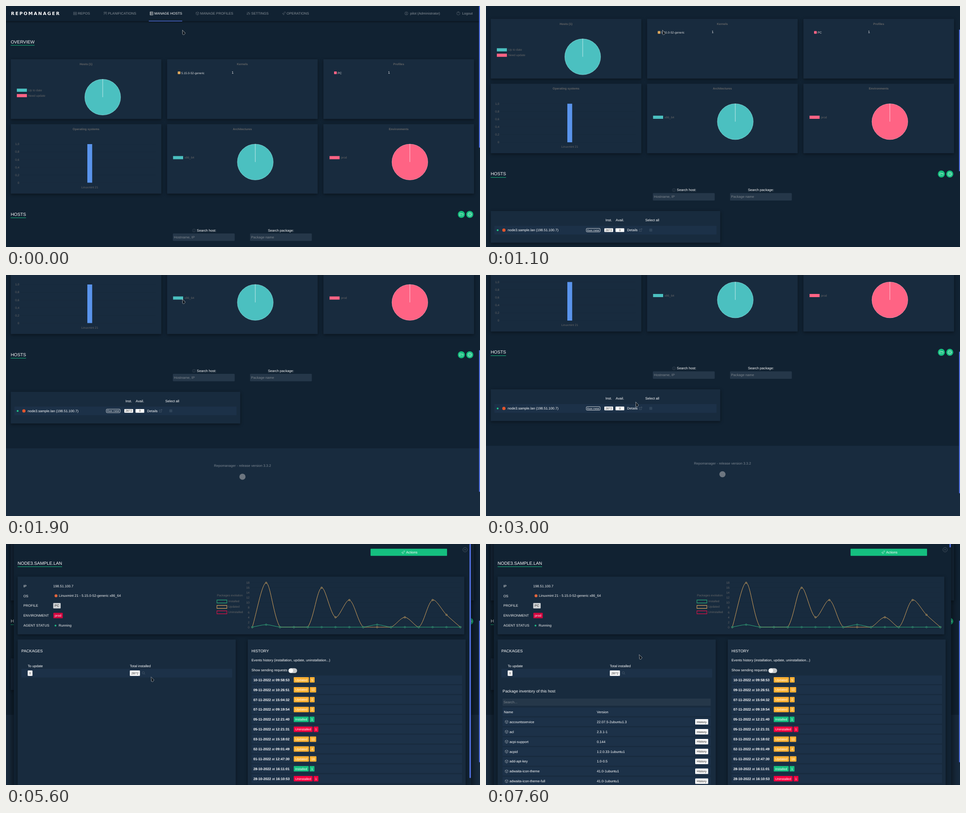
These frames come from a looping animation (1049 px wide and 534 px high, 9500 ms). An HTML page with a canvas:

```html
<!DOCTYPE html>
<html lang="en">
<head>
<meta charset="utf-8">
<title>Manage hosts</title>
<style>
html, body { margin: 0; width: 100%; height: 100%; overflow: hidden; background: #112232; }
canvas { display: block; }
</style>
</head>
<body>
<canvas id="stage" width="1049" height="534"></canvas>
<script>
const W = 1049, H = 534, LOOP = 9500, STEP = 100;
const K = W / 1920; // the interface is laid out for a 1920 px wide window
const BG = '#112232', CARD = '#182b3e', ROW = '#1c3148', INPUT = '#253749';
const GREEN = '#15bf7f', RED = '#f5003f', AMBER = '#ffb032', BLUE = '#5473e8';
const TEAL = '#4bc0c0', PINK = '#ff6384', ORANGE = '#d9a55c', MINT = '#2cae7d';
const GREY = '#666', DIM = 'rgba(255,255,255,.5)', FAINT = 'rgba(255,255,255,.22)';
const HOST = 'node3.sample.lan', IP = '198.51.100.7';

const stage = document.getElementById('stage').getContext('2d');
const layer = document.createElement('canvas');
layer.width = W;
layer.height = H;
const panel = layer.getContext('2d');
let c = stage;

// [time, value...] keys
const SCROLL = [[800, 0], [900, 20], [1000, 62], [1100, 89.5], [1200, 110], [1300, 119],
  [1400, 119], [1500, 147], [1600, 190], [1700, 230], [1800, 264], [1900, 285], [2000, 290.5]];
const POINTER = [[2000, 390.5, 53.5], [2100, 389, 62], [2400, 371, 146], [2500, 371, 146],
  [2800, 340, 245], [3100, 327, 300], [3200, 327, 300], [3500, 340, 299], [3800, 331.5, 295.5],
  [5400, 331.5, 295.5], [5600, 321.2, 294.8], [5900, 321.2, 294.8], [6400, 302, 282.5],
  [6600, 302, 282.5], [6800, 248, 297], [7000, 303, 283], [7100, 303, 283], [7300, 339.2, 245.3]];

function sample(keys, t) {
  let i = 0;
  while (i < keys.length - 1 && keys[i + 1][0] <= t) i++;
  const a = keys[i], b = keys[i + 1] || a;
  const u = b === a ? 0 : Math.max(0, (t - a[0]) / (b[0] - a[0]));
  return a.slice(1).map((v, n) => v + (b[n + 1] - v) * u);
}

const clamp = (v, lo, hi) => Math.min(hi, Math.max(lo, v));

// --- drawing helpers; text y is the middle of the capitals ---
function text(s, x, y, { size = 14, color = '#fff', bold = false, align = 'left',
  family = '"Liberation Sans", Arial, sans-serif', gap = 0 } = {}) {
  c.save();
  c.translate(x, y + size * K * 0.36);
  c.scale(K, K);
  c.font = `${bold ? 'bold ' : ''}${size}px ${family}`;
  c.textRendering = 'geometricPrecision';
  c.letterSpacing = gap + 'px';
  c.textAlign = align;
  c.fillStyle = color;
  c.fillText(s, 0, 0);
  const w = c.measureText(s).width * K;
  c.restore();
  return w;
}

function box(x, y, w, h, color, r = 0) {
  c.fillStyle = color;
  c.beginPath();
  c.roundRect(x, y, w, h, r);
  c.fill();
}

function frame(x, y, w, h, color, r = 0, lw = 0.8) {
  c.strokeStyle = color;
  c.lineWidth = lw;
  c.beginPath();
  c.roundRect(x, y, w, h, r);
  c.stroke();
}

function disc(x, y, r, color) {
  c.fillStyle = color;
  c.beginPath();
  c.arc(x, y, r, 0, 7);
  c.fill();
}

function ring(x, y, r, color, lw = 0.7) {
  c.strokeStyle = color;
  c.lineWidth = lw;
  c.beginPath();
  c.arc(x, y, r, 0, 7);
  c.stroke();
}

function path(points, color, lw = 0.7, close = false) {
  c.strokeStyle = color;
  c.lineWidth = lw;
  c.beginPath();
  points.forEach(([x, y]) => c.lineTo(x, y));
  if (close) c.closePath();
  c.stroke();
}

function card(x, y, w, h) {
  c.save();
  c.shadowColor = 'rgba(0,0,0,.45)';
  c.shadowBlur = 7;
  c.shadowOffsetY = 2;
  box(x, y, w, h, CARD, 1);
  c.restore();
}

function heading(s, x, y) {
  const w = text(s, x, y, { size: 18 });
  box(x, y + 7.6, w, 0.9, GREEN);
}

// a filled label; returns its right edge
function badge(s, x, y, bg, color = '#fff') {
  const w = text(s, x, -99, { size: 13 }) + 6.6;
  box(x, y - 6, w, 12, bg, 1.2);
  text(s, x + 3.3, y, { size: 13, color });
  return x + w;
}

const icons = {
  stack(x, y, col) {
    for (const d of [-2, 0.3, 2.6]) frame(x - 3.5, y + d - 1, 7, 1.8, col, 0, 0.6);
  },
  plan(x, y, col) {
    frame(x - 3, y - 3, 2.4, 2.4, col);
    frame(x + 0.6, y - 3, 2.4, 2.4, col);
    path([[x - 3, y + 1], [x + 3, y + 1], [x + 3, y + 3.4]], col);
    path([[x - 3, y + 3.3], [x - 3, y + 1]], col);
  },
  list(x, y, col) {
    frame(x - 3.2, y - 3.4, 6.4, 7, col);
    for (const d of [-1.2, 1.2]) path([[x - 3, y + d], [x + 3, y + d]], col);
    path([[x - 1.2, y - 3.3], [x - 1.2, y + 3.5]], col);
  },
  cube(x, y, col) {
    path([[x, y - 3.6], [x + 3.2, y - 1.9], [x + 3.2, y + 1.9], [x, y + 3.6],
      [x - 3.2, y + 1.9], [x - 3.2, y - 1.9]], col, 0.7, true);
    path([[x - 3.2, y - 1.9], [x, y - 0.2], [x + 3.2, y - 1.9]], col);
    path([[x, y - 0.2], [x, y + 3.6]], col);
  },
  sliders(x, y, col) {
    [-2.6, 0, 2.6].forEach((d, i) => {
      path([[x + d, y - 3.5], [x + d, y + 3.5]], col, 0.6);
      disc(x + d, y + [1.5, -1.5, 0.8][i], 0.9, col);
    });
  },
  rocket(x, y, col) {
    path([[x - 1.6, y - 0.2], [x + 1, y - 2.8], [x + 3.3, y - 3.3], [x + 2.8, y - 1],
      [x + 0.2, y + 1.6]], col, 0.7, true);
    path([[x - 1.6, y - 0.2], [x - 3.3, y + 0.2], [x - 2, y + 2], [x - 0.2, y + 3.3], [x + 0.2, y + 1.6]], col);
  },
  user(x, y, col) {
    ring(x, y, 3.6, col);
    ring(x, y - 0.8, 1.2, col, 0.6);
    path([[x - 2, y + 2.4], [x, y + 1.2], [x + 2, y + 2.4]], col, 0.6);
  },
  power(x, y, col) {
    ring(x, y, 3.5, col);
    path([[x, y - 4], [x, y]], col);
  },
  info(x, y, col) {
    ring(x, y, 3.4, col, 0.6);
    path([[x, y - 0.6], [x, y + 1.9]], col);
    disc(x, y - 1.7, 0.4, col);
  },
  link(x, y, col) {
    path([[x + 0.3, y - 2], [x - 2.8, y - 2], [x - 2.8, y + 2.8], [x + 2, y + 2.8], [x + 2, y]], col);
    path([[x - 0.5, y + 0.5], [x + 3, y - 3], [x + 0.8, y - 3]], col);
    path([[x + 3, y - 3], [x + 3, y - 0.8]], col);
  },
  lens(x, y, col) {
    ring(x - 0.6, y - 0.6, 2.5, col);
    path([[x + 1.2, y + 1.2], [x + 3.4, y + 3.4]], col);
  },
  folder(x, y, col) {
    path([[x - 3.8, y + 2.8], [x - 3.8, y - 2.8], [x - 1.2, y - 2.8], [x - 0.4, y - 1.8],
      [x + 3.2, y - 1.8], [x + 3.2, y - 0.8]], col);
    path([[x - 3.8, y + 2.8], [x - 2.4, y - 0.8], [x + 4.4, y - 0.8], [x + 3.2, y + 2.8]], col, 0.7, true);
  },
  gear(x, y, col) {
    ring(x, y, 1.7, col);
    c.setLineDash([1.7, 1.2]);
    ring(x, y, 4, col, 1.2);
    c.setLineDash([]);
    ring(x, y, 3.5, col, 0.5);
  },
};

// --- the page ---
const NAV = [['stack', 152.8, 'REPOS', 159], ['plan', 219.8, 'PLANIFICATIONS', 225.7],
  ['list', 322, 'MANAGE HOSTS', 328.2], ['cube', 423.7, 'MANAGE PROFILES', 429.8],
  ['sliders', 536.5, 'SETTINGS', 542.8], ['rocket', 615, 'OPERATIONS', 621],
  ['user', 886, 'pilot (Administrator)', 894.3], ['power', 1001, 'Logout', 1009.5]];

function nav() {
  c.save();
  c.shadowColor = 'rgba(0,0,0,.5)';
  c.shadowBlur = 4;
  c.shadowOffsetY = 1;
  box(-5, -5, W + 10, 38.5, BG);
  c.restore();
  text('REPOMANAGER', 11, 16.3, { size: 18, bold: true, gap: 4, family: '"DejaVu Sans", sans-serif' });
  NAV.forEach(([icon, ix, label, x], i) => {
    const on = i === 2;
    icons[icon](ix, 16.4, on ? '#ddd' : 'rgba(255,255,255,.3)');
    text(label, x, on ? 16 : 16.5, { color: on ? '#fff' : DIM });
  });
  box(316, 32.7, 74, 1.3, BLUE);
}

function pie(x, y, color) {
  disc(x, y, 40, color);
  ring(x, y, 39.7, 'rgba(255,255,255,.4)', 0.6);
  path([[x, y], [x, y - 40]], 'rgba(255,255,255,.75)', 0.9);
}

function key(x, y, color, label) {
  box(x, y - 3.5, 22.3, 7, color);
  text(label, x + 25.3, y - 0.2, { size: 12, color: GREY });
}

function item(x, color, label) {
  box(x, 145, 6, 6, color, 1);
  text(label, x + 8, 148.5, { size: 12, color: '#ddd' });
  text('1', x + 119.5, 146.8, { color: '#eee' });
}

function overview() {
  heading('OVERVIEW', 10.4, 79);
  ['Hosts (1)', 'Kernels', 'Profiles', 'Operating systems', 'Architectures', 'Environments'].forEach((s, i) => {
    const x = 10.4 + (i % 3) * 346, low = i > 2;
    card(x, low ? 261.7 : 118, 333.4, low ? 154 : 132.3);
    text(s, x + 166.7, low ? 272.6 : 129, { size: 12, bold: true, color: GREY, align: 'center' });
  });
  key(24, 186.6, TEAL, 'Up to date');
  key(24, 198.6, PINK, 'Need update');
  pie(214, 202, TEAL);
  item(380, ORANGE, '5.15.0-52-generic');
  item(726, PINK, 'PC');

  for (let i = 0; i <= 5; i++) {
    const y = 391.5 - i * 17.1;
    box(32, y - 0.3, 299, 0.6, 'rgba(0,0,0,.1)');
    text(i === 0 ? '0' : i === 5 ? '1,0' : '0,' + i * 2, 29.4, y, { size: 12, color: GREY, align: 'right' });
  }
  box(180, 306, 10.7, 85.5, '#5a94ec');
  text('Linuxmint 21', 185.3, 401.6, { size: 12, color: GREY, align: 'center' });
  key(369.7, 336, TEAL, 'x86_64');
  pie(551.7, 345.7, TEAL);
  key(716, 336, PINK, 'prod');
  pie(893.8, 345.7, PINK);
}

function hosts() {
  heading('HOSTS', 10.4, 461.2);
  disc(1007.7, 461.8, 7.7, GREEN);
  disc(1026.4, 461.8, 7.7, GREEN);
  icons.folder(1007.7, 461.8, 'rgba(255,255,255,.65)');
  icons.gear(1026.4, 461.8, 'rgba(255,255,255,.65)');

  icons.info(416, 497.4, FAINT);
  text('Search host:', 422.3, 497);
  text('Search package:', 608.4, 497, { align: 'center' });
  [[369.3, 'Hostname, IP'], [540, 'Package name']].forEach(([x, s]) => {
    box(x, 504, 136.8, 16.4, INPUT, 1.5);
    text(s, x + 2.2, 512.2, { color: '#7d858d' });
  });

  card(10.4, 543.8, 508, 70.3);
  text('Inst.', 264.3, 564);
  text('Avail.', 287, 564);
  text('Select all', 352.4, 564);
  box(18.5, 576.5, 491.8, 19.2, ROW, 1);
  const y = 586;
  disc(25.8, y + 0.3, 2, '#1fc98a');
  disc(39.6, y + 0.2, 3.6, '#e2552c');
  text(`${HOST} (${IP})`, 48, y);
  frame(222, y - 3.7, 30.6, 7.7, '#fff', 1.5);
  text('Bare metal', 237.3, y + 0.3, { size: 10, align: 'center' });
  [[271.6, '2872'], [296.3, '0']].forEach(([x, s]) => {
    box(x - 9.7, y - 4, 19.4, 8.2, '#fff', 1);
    text(s, x, y + 0.1, { size: 12, color: '#222', align: 'center' });
  });
  text('Details', 312.3, y);
  icons.link(342, y, FAINT);
  box(361.5, y - 3.2, 6.5, 6.5, '#2f4459', 1);
}

function page(scroll) {
  box(0, 0, W, H, BG);
  c.save();
  c.translate(0, -scroll);
  nav();
  overview();
  hosts();
  box(0, 669, W, 300, CARD);
  text('Repomanager - release version 3.3.2', 523.3, 707.4, { color: '#7b858f', align: 'center' });
  disc(523.3, 732, 6.8, '#6d7680');
  c.restore();
  box(1046.9, scroll * 0.584, 2.1, 314, BLUE, 1);
}

// --- the host panel ---
const UPDATED = [0, 18, 0, 0, 0, 16, 4, 11, 0, 0, 0, 4, 0, 11, 5, 0];
const INSTALLED = UPDATED.map((v, i) => i === 1 || i === 9 ? 1 : 0);
const TOP = 86, BASE = 184.2;

function curve(values, grow, color) {
  const p = values.map((v, i) => [545 + i * 30.7, BASE - v * grow * (BASE - TOP) / 18]);
  const dist = (a, b) => Math.hypot(b[0] - a[0], b[1] - a[1]);
  const ctl = p.map((q, i) => {
    const a = p[i - 1] || q, b = p[i + 1] || q, d = dist(a, q), e = dist(q, b);
    const at = f => [q[0] + f * (b[0] - a[0]), clamp(q[1] + f * (b[1] - a[1]), TOP, BASE)];
    return [at(-0.3 * d / (d + e)), at(0.3 * e / (d + e))];
  });
  c.strokeStyle = color;
  c.lineWidth = 1;
  c.beginPath();
  c.moveTo(...p[0]);
  for (let i = 1; i < p.length; i++) c.bezierCurveTo(...ctl[i - 1][1], ...ctl[i][0], ...p[i]);
  c.stroke();
  for (const [x, y] of p) {
    disc(x, y, 1.7, '#30424d');
    ring(x, y, 1.7, color, 0.9);
  }
}

function chart(grow) {
  text('Packages evolution', 467, 113.3, { size: 12, color: GREY });
  [['Installed', MINT], ['Updated', ORANGE], ['Uninstalled', '#e0104a']].forEach(([s, col], i) => {
    const y = 127.3 + i * 12;
    frame(466.8, y - 3.2, 22, 6.5, col, 0, 1.1);
    text(s, 492, y - 0.2, { size: 12, color: GREY });
  });
  for (let v = 0; v <= 18; v += 2) {
    const y = BASE - v * (BASE - TOP) / 18;
    box(541, y - 0.3, 465, 0.6, 'rgba(0,0,0,.1)');
    text(String(v), 539, y, { size: 12, color: GREY, align: 'right' });
  }
  curve(UPDATED, grow, ORANGE);
  curve(INSTALLED, grow, MINT);
}

function details(grow) {
  box(806.8, 10.5, 169.3, 15.7, GREEN, 1);
  icons.rocket(879, 18.5, 'rgba(255,255,255,.7)');
  text('Actions', 885.5, 18.4);
  ring(1016, 12.7, 4.9, 'rgba(255,255,255,.3)');
  path([[1014.3, 11], [1017.7, 14.4]], 'rgba(255,255,255,.3)');
  path([[1017.7, 11], [1014.3, 14.4]], 'rgba(255,255,255,.3)');
  heading(HOST.toUpperCase(), 25.7, 42.2);

  card(25.7, 72.3, 988.6, 128);
  ['IP', 'OS', 'PROFILE', 'ENVIRONMENT', 'AGENT STATUS'].forEach((s, i) =>
    text(s, 38.4, 92.8 + i * 21.95, { color: '#eee' }));
  text(IP, 104.5, 92.8, { color: '#eee' });
  disc(110.7, 114.8, 3.2, '#e2653c');
  text('Linuxmint 21 - 5.15.0-52-generic x86_64', 117, 114.7, { color: '#eee' });
  badge('PC', 104.5, 136.7, '#d0d3d6', '#222');
  badge('prod', 104.8, 158.6, '#d4063f');
  disc(109.5, 180.8, 2, '#1fb983');
  text('Running', 116.5, 180.6, { color: '#eee' });
  chart(grow);
}

const PACKAGES = [['accountsservice', '22.07.5-2ubuntu1.3'], ['acl', '2.3.1-1'],
  ['acpi-support', '0.144'], ['acpid', '1:2.0.33-1ubuntu1'], ['add-apt-key', '1.0-0.5'],
  ['adwaita-icon-theme', '41.0-1ubuntu1'], ['adwaita-icon-theme-full', '41.0-1ubuntu1']];

function inventory() {
  text('Package inventory of this host', 36.8, 326.3, { size: 16 });
  box(36.6, 342.5, 460.8, 16, INPUT, 1);
  text('Search...', 38.7, 350.7, { color: '#7d858d' });
  box(36.6, 362.3, 460.8, 19.3, ROW, 1);
  text('Name', 39.5, 372.2);
  text('Version', 245.2, 372.2);
  PACKAGES.forEach(([name, version], i) => {
    const y = 394.1 + i * 21.9;
    box(36.6, y - 9.8, 460.8, 19.3, ROW, 1);
    icons.cube(45.6, y, 'rgba(255,255,255,.55)');
    text(name, 52, y);
    text(version, 245.2, y);
    badge('History', 463, y, '#fff', '#222');
  });
}

function packages(open) {
  card(25.7, 211.5, 482.8, 340);
  text('PACKAGES', 34, 237.2, { size: 16 });
  text('To update', 48, 270.4);
  text('Total installed', 274, 270.4);
  box(34, 276.5, 466.5, 19.3, ROW, 1);
  badge('0', 48, 286.2, '#fff', '#222');
  badge('2872', 274, 286.2, '#fff', '#222');
  icons.lens(304.5, 286, FAINT);
  if (open) inventory();
}

const EVENTS = [['10-11', '09:58:53', 'U', 5], ['09-11', '10:26:51', 'U', 11],
  ['07-11', '15:04:32', 'U', 2], ['07-11', '09:19:54', 'U', 2], ['05-11', '12:21:40', 'I', 1],
  ['05-11', '12:21:31', 'X', 1], ['03-11', '15:18:02', 'U', 11], ['02-11', '09:01:49', 'U', 4],
  ['01-11', '12:47:30', 'U', 16], ['28-10', '16:11:01', 'I', 1], ['28-10', '16:10:53', 'X', 1]];
const KINDS = { U: ['Updated', AMBER], I: ['Installed', GREEN], X: ['Uninstalled', RED] };

function history() {
  card(535, 211.5, 482.3, 340);
  text('HISTORY', 543.2, 237.2, { size: 16 });
  text('Events history (installation, update, uninstallation...)', 543.2, 257.7);
  text('Show sending requests', 543.2, 279.5);
  box(625, 275.2, 19.3, 10.8, '#c5c8ca', 5.4);
  disc(630.5, 280.6, 4.9, '#fff');
  EVENTS.forEach(([day, time, kind, n], i) => {
    const y = 301 + i * 21.9, [label, color] = KINDS[kind];
    box(543.3, y - 9.8, 466, 19.3, ROW, 1);
    let x = 547.5;
    x += text(day + '-2022', x, y, { bold: true });
    x += text(' at ', x, y);
    text(time, x, y, { bold: true });
    badge(String(n), badge(label, 636.8, y, color) + 2.2, y, color);
  });
}

function hostPanel(t) {
  const open = t >= 7200;
  c = panel;
  c.clearRect(0, 0, W, H);
  c.save();
  c.shadowColor = 'rgba(0,0,0,.8)';
  c.shadowBlur = 18;
  box(17.3, -30, 1012, H + 60, BG);
  c.restore();
  details(1 - Math.pow(1 - clamp((t - 4600) / 1000, 0, 1), 4));
  packages(open);
  history();
  box(1025.8, open ? -2 : 0, 2.9, open ? 9.5 : 518.5, BLUE, 1.2);
  c = stage;
}

function pointer(x, y) {
  c.save();
  c.translate(x, y);
  c.lineJoin = 'round';
  c.fillStyle = '#141c24';
  const shape = [[0, 0], [0.6, 9.4], [3.6, 10.2], [6.2, 6.4]];
  path(shape, '#fff', 1, true);
  c.fill();
  c.restore();
}

function draw(t) {
  page(sample(SCROLL, t)[0]);
  if (t > 4500) {
    hostPanel(t);
    c.globalAlpha = 0.5 - 0.5 * Math.cos(Math.PI * clamp((t - 4500) / 500, 0, 1));
    c.drawImage(layer, 0, 0);
    c.globalAlpha = 1;
  }
  pointer(...sample(POINTER, t));
}

let last = -1;
const start = performance.now();
function tick() {
  const t = Math.floor(((performance.now() - start) % LOOP) / STEP) * STEP;
  if (t !== last) draw(last = t);
  requestAnimationFrame(tick);
}
tick();
</script>
</body>
</html>
```
